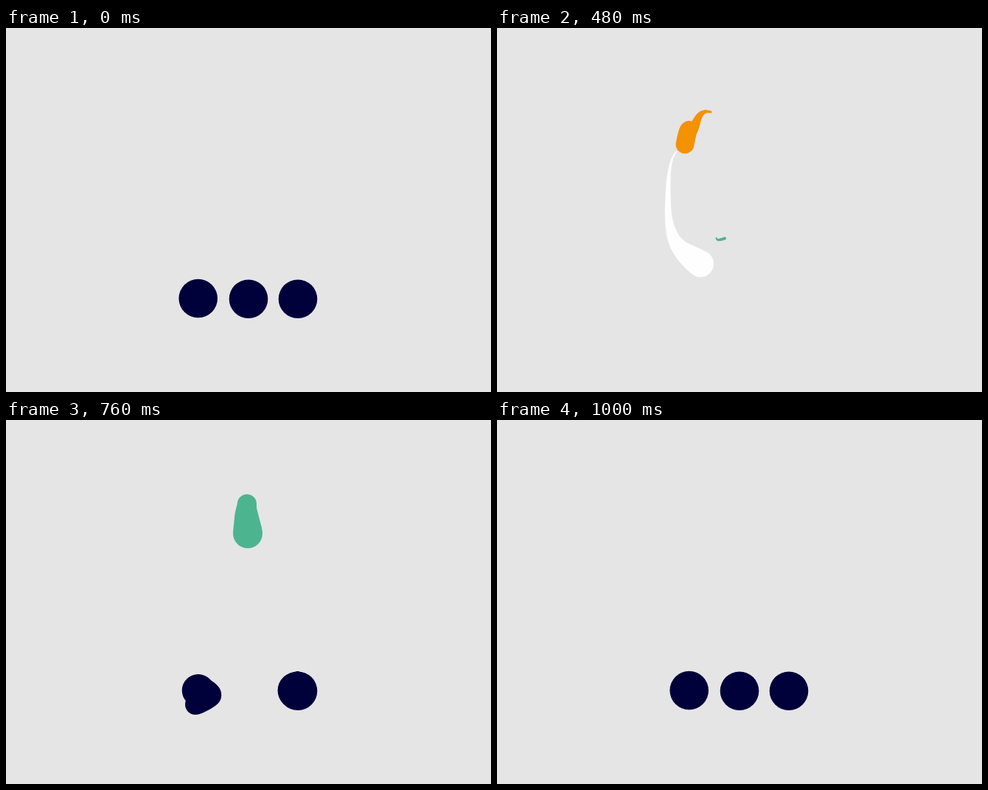
Animation of 658x494 px, one loop 1.44 s. Source, as an HTML page with a canvas:

```html
<!DOCTYPE html>
<html lang="en">
<head>
<meta charset="utf-8">
<title>Three dots loop</title>
<style>
html, body { margin: 0; height: 100%; overflow: hidden; background: #e5e5e5; }
canvas { display: block; }
</style>
</head>
<body>
<canvas id="stage" width="658" height="494"></canvas>
<script>
const ctx = document.getElementById('stage').getContext('2d');
const LOOP = 1440, STEP = 40, R = 26.3;
const NAVY = [0, 0, 58], WHITE = [254, 254, 254], ORANGE = [244, 146, 4], GREEN = [77, 180, 144];
const FULL = Array(5).fill(R), NONE = Array(5).fill(0);
const DOTS = [[260.7, 367], [329, 367.7], [396, 367.7]];

const clamp = (v, lo, hi) => Math.min(hi, Math.max(lo, v));
const mix = (a, b, k) => a.map((v, i) => v + (b[i] - v) * k);

// Catmull-Rom value of a list of numbers at position u
function spline(list, u) {
  const last = list.length - 1;
  u = clamp(u, 0, last);
  const i = Math.min(Math.floor(u), last - 1), f = u - i;
  const [a, b, c, d] = [-1, 0, 1, 2].map(k => list[clamp(i + k, 0, last)]);
  return b + f / 2 * (c - a + f * (2 * a - 5 * b + 4 * c - d + f * (3 * (b - c) + d - a)));
}

// Each key: time, tail and head position on the path, five radii from tail to head
const exitKeys = [
  [0, 0, 0, ...FULL],
  [40, 0, .5, 18, 20, 22, 23, 24],
  [80, .8, 1.6, 5, 9, 14, 18, 20],
  [120, 2, 3, 2, 5, 8, 12, 14],
  [160, 3.5, 4.6, 1, 2, 4, 5, 6],
  [200, 5, 5, ...NONE]
];

const exits = DOTS.map((dot, i) => ({
  path: [dot, [462, 300], [330, 36], [26, 190], [130, 390], [318, 283]],
  keys: exitKeys, color: NAVY, lag: (2 - i) * .12
}));

const comets = [{
  color: WHITE, fade: [520, 600],
  path: [[318, 282], [344, 282], [363, 272], [386, 220], [366, 159], [335, 146.5], [302, 143],
    [243, 168], [232, 235], [241, 288], [276, 320], [335, 352], DOTS[2]],
  keys: [
    [120, 0, 0, ...NONE],
    [200, 1, 2, .8, 1.5, 2.5, 3.8, 4.5],
    [280, 2.5, 4, 1, 2.5, 4.5, 7, 9],
    [360, 4, 6, 1.5, 4, 7.5, 11.5, 14],
    [480, 7, 10, 1, 3.3, 5.5, 11, 18],
    [520, 9, 11.3, 2, 6, 12, 18, 23],
    [560, 11, 12, 8, 13, 19, 23, 26],
    [680, 11.72, 12, 15, 19, 23, 25, R],
    [840, 11.9, 12, 21, 23, 25, 26, R],
    [1000, 12, 12, ...FULL]
  ]
}, {
  color: ORANGE, fade: [560, 640],
  path: [[318, 281], [340, 282], [378, 255], [390, 191], [369, 162], [290, 114], [266, 136],
    [255, 158], [228, 330], [242, 380], [257, 386], [277, 374], DOTS[0]],
  keys: [
    [160, 0, 0, ...NONE],
    [200, 0, 1, .7, 1, 1.4, 2.1, 2.5],
    [360, 3, 4, 2, 2.6, 3.8, 5, 4.5],
    [480, 5, 7, 1.5, 4.5, 7.5, 11.5, 12.5],
    [560, 7.5, 8.5, 3, 7, 11, 15, 17],
    [600, 8.1, 9.5, 6, 10, 14, 15, 15],
    [680, 9, 11, 15, 10.5, 10, 10, 12],
    [760, 10, 12, 14, 14, 15, 18, 22],
    [840, 11.6, 12, 19, 21, 24, 26, R],
    [1000, 12, 12, ...FULL]
  ]
}, {
  color: GREEN, fade: [880, 960],
  path: [[297, 285], [309, 285.5], [378, 255], [385, 180], [335, 106.5], [326.5, 119],
    [328, 154], [330.5, 205], [329, 255], DOTS[1]],
  keys: [
    [440, 0, 0, ...NONE],
    [480, 0, 1, .6, 1, 1.3, 1.6, 2],
    [560, 1.8, 3, 1, 3, 6, 9, 11],
    [640, 3.5, 4.6, 4, 9, 14, 18, 20],
    [680, 4, 5, 15, 17, 19, 21, 22.3],
    [760, 4.8, 6, 13, 14, 16, 18, 20],
    [840, 6, 8, 7, 4, 1.3, 13, 15.5],
    [920, 7.6, 9, 2, 4, 8, 17, 23],
    [1000, 9, 9, ...FULL]
  ]
}];

function poseAt(keys, t) {
  const next = keys.findIndex(k => k[0] > t);
  if (next < 0) return keys[keys.length - 1];
  if (next === 0) return keys[0];
  const a = keys[next - 1], b = keys[next];
  return mix(a, b, (t - a[0]) / (b[0] - a[0]));
}

function drawBlob({ path, keys, color, fade, lag = 0 }, t) {
  const [, tail, head, ...radii] = poseAt(keys, t);
  if (Math.max(...radii) <= 0) return;
  const xs = path.map(p => p[0]), ys = path.map(p => p[1]);
  const tint = fade ? mix(color, NAVY, clamp((t - fade[0]) / (fade[1] - fade[0]), 0, 1)) : color;
  const n = tail === head ? 0 : 160;
  ctx.fillStyle = `rgb(${tint.map(Math.round)})`;
  ctx.beginPath();
  for (let i = 0; i <= n; i++) {
    const k = n ? i / n : 1, u = tail + (head - tail) * k - lag;
    const x = spline(xs, u), y = spline(ys, u), r = Math.max(0, spline(radii, k * 4));
    ctx.moveTo(x + r, y);
    ctx.arc(x, y, r, 0, 2 * Math.PI);
  }
  ctx.fill();
}

function draw(t) {
  ctx.fillStyle = '#e5e5e5';
  ctx.fillRect(0, 0, 658, 494);
  for (const blob of [...exits, ...comets]) drawBlob(blob, t);
}

const start = performance.now();
function tick() {
  const t = (performance.now() - start) % LOOP;
  draw(Math.floor(t / STEP) * STEP);
  requestAnimationFrame(tick);
}
tick();
</script>
</body>
</html>
```
